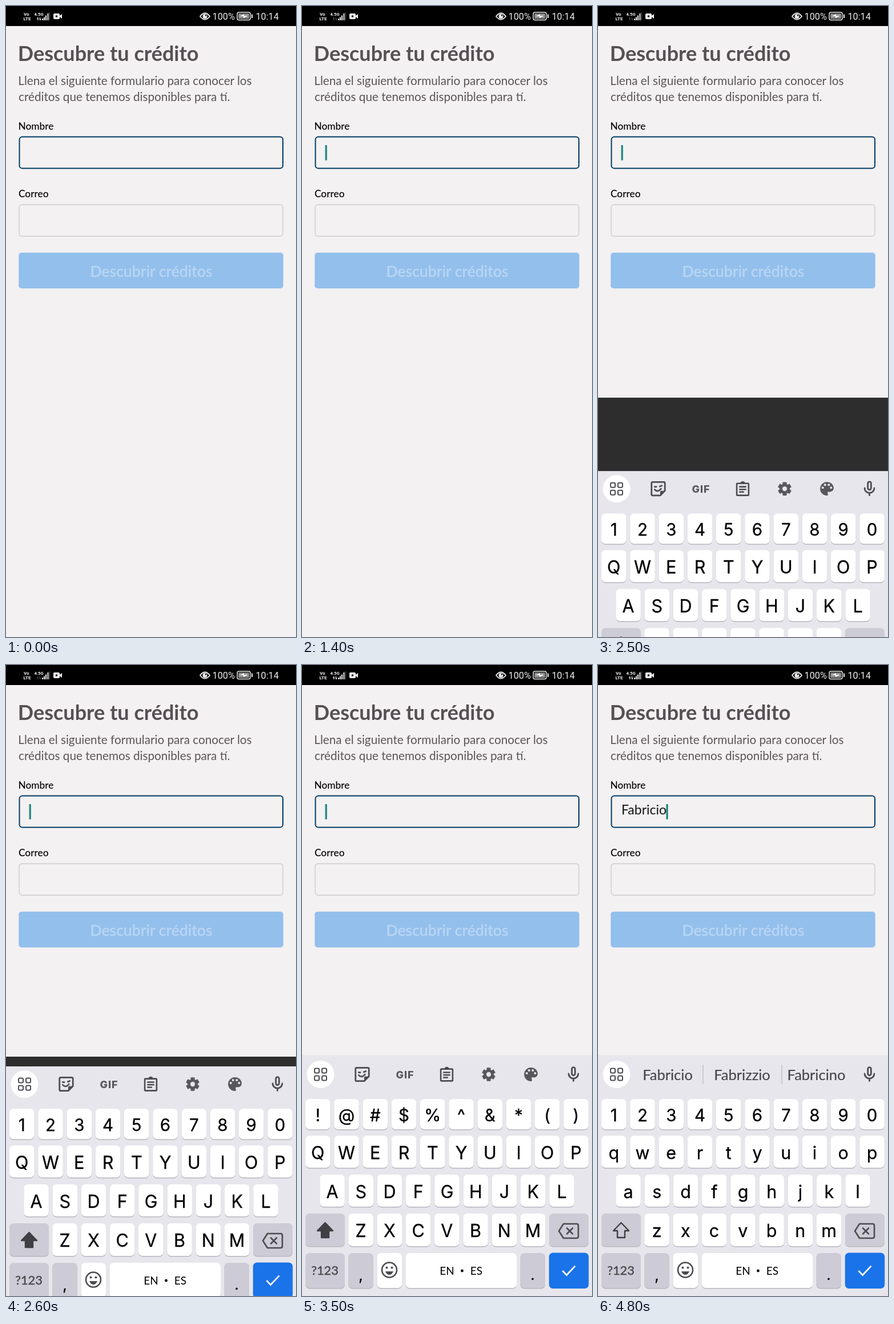
These frames come from a looping animation (508 by 1102 pixels, 5000 ms). An HTML page:

```html
<!DOCTYPE html>
<html lang="es">
<head>
<meta charset="utf-8">
<title>Descubre tu crédito</title>
<style>
html, body { margin: 0; width: 100%; height: 100%; overflow: hidden; background: #f3f1f2; }
svg { display: block; width: 100%; height: 100%; }
text { font-family: Lato, "Noto Sans", sans-serif; white-space: pre; }
.mid { text-anchor: middle; }
.key { font: 400 30.5px Inter, Roboto, sans-serif; text-anchor: middle; fill: #000; stroke: #000; stroke-width: .3; }
.digit { font-size: 29.5px; }
.mark { font-size: 26px; }
.word { font-size: 25.5px; fill: #48474c; text-anchor: middle; stroke: #48474c; stroke-width: .2; }
.bar { font-family: Roboto, sans-serif; fill: #ececec; }
.tiny { font: 700 8px Roboto, sans-serif; fill: #f4f4f4; }
.line { fill: none; stroke: #4b4b50; stroke-width: 2; stroke-linejoin: round; stroke-linecap: round; }
</style>
</head>
<body>
<svg viewBox="0 0 508 1102" preserveAspectRatio="none">
  <rect width="508" height="1102" fill="#f3f1f2"/>

  <g id="status">
    <rect width="508" height="35"/>
    <text class="tiny" x="31" y="17">Vo</text>
    <text class="tiny" x="30.5" y="25">LTE</text>
    <text class="tiny" x="49.5" y="17" style="font-size:7.6px">4.5G</text>
    <path id="arrows" d="M56 25V20.5M54.5 22L56 20.2M59.5 20V24.5M61 23L59.5 24.8" fill="none" stroke-width="1.3"/>
    <path d="M64 25v-3M67 25v-5.5M70 25v-8.5M73.5 25v-12" stroke="#f4f4f4" stroke-width="2"/>
    <path d="M76.5 25V11" stroke="#666" stroke-width="1"/>
    <rect x="83" y="13" width="11" height="10" rx="2" fill="#f4f4f4"/>
    <path d="M94 17l4-3v8l-4-3z" fill="#f4f4f4"/>
    <circle cx="88.5" cy="18" r="1.8"/>
    <path d="M340 18q8.500-11 17 0q-8.500 11-17 0z" fill="none" stroke="#ececec" stroke-width="1.8"/>
    <circle cx="348.5" cy="18" r="4" fill="#ececec"/>
    <circle cx="350" cy="16.5" r="1.2"/>
    <text class="bar" x="361.5" y="24" font-size="16.3">100%</text>
    <rect x="405" y="11" width="23" height="13.5" rx="3" fill="none" stroke="#ececec" stroke-width="1.5"/>
    <rect x="407" y="13" width="19" height="9.5" rx="1.5" fill="#8d8d8d"/>
    <path d="M409 18l8-3.5v2.5h7l-8 4v-3z" fill="#fff"/>
    <path d="M431 14.5v6.5" stroke="#ececec" stroke-width="2"/>
    <text class="bar" x="437.5" y="24" font-size="16.2">10:14</text>
  </g>

  <g id="form">
    <text x="20.8" y="95.5" font-size="36" font-weight="700" fill="#555053">Descubre tu crédito</text>
    <g font-size="20.7" fill="#5a5558">
      <text x="21.3" y="137.5">Llena el siguiente formulario para conocer los</text>
      <text x="22" y="166">créditos que tenemos disponibles para tí.</text>
    </g>
    <g font-size="17.3" font-weight="500">
      <text x="21.5" y="215.5">Nombre</text>
      <text x="22" y="334">Correo</text>
    </g>
    <rect x="23.5" y="228.5" width="461.5" height="55" rx="5" fill="none" stroke="#003a63" stroke-width="2"/>
    <rect x="23" y="347" width="462" height="55" rx="5" fill="none" stroke="#cfcdce" stroke-width="1.4"/>
    <rect x="22.3" y="430.8" width="463.4" height="62.4" rx="5" fill="#93bfec"/>
    <text class="mid" x="254.5" y="473" font-size="26.6" font-weight="500" fill="#b9d6f3" stroke="#b9d6f3" stroke-width=".3">Descubrir créditos</text>
    <text id="typed" x="41" y="261" font-size="23" fill="#161616"></text>
    <rect id="caret" y="243" width="3.2" height="26.5" fill="#1c857c"/>
  </g>

  <rect id="gap" y="684" width="508" height="418" fill="#2d2d2d"/>
  <rect id="edge" y="681" width="508" height="3" fill="#e9e8eb"/>
  <g id="board"></g>
</svg>
<script>
const $ = id => document.getElementById(id);
const LOOP = 5000, SLIDE = 418;
const PITCH = 50.25, INK = '#4b4b50';
const letters = [], digits = [];

const key = (x, y, w, h, fill = '#fff') =>
  `<rect x="${x}" y="${y + 1.5}" width="${w}" height="${h}" rx="7" fill="#b8b7bf"/>` +
  `<rect x="${x}" y="${y}" width="${w}" height="${h}" rx="7" fill="${fill}"/>`;

const row = (chars, x0, y, h, base, kind) => [...chars].map((c, i) => {
  const x = x0 + i * PITCH;
  return key(x, y, 43.5, h) +
    `<text class="key ${kind}" data-kind="${kind}" x="${x + 21.75}" y="${base}">${c}</text>`;
}).join('');

const icon = (cx, cy, scale, body) =>
  `<g transform="translate(${cx} ${cy}) scale(${scale}) translate(-12 -12)">${body}</g>`;

const tiles = [[22, 704.5], [35, 704.5], [22, 717.5], [35, 717.5]].map(([x, y]) =>
  `<rect class="line" x="${x}" y="${y}" width="8" height="8" rx="2"/>`).join('');

const sticker = icon(105.5, 715, 1.38,
  `<path class="line" d="M5 3.5H19Q20.5 3.5 20.5 5V14.5L14.5 20.5H5Q3.5 20.5 3.5 19V5Q3.5 3.5 5 3.5z"/>
   <path d="M14.5 20.5V16Q14.5 14.5 16 14.5H20.5z" fill="${INK}"/>
   <path class="line" d="M7.5 9.5h2M14 9l2.5-1M7.5 13q4 4 8-1"/>`);

const clipboard = icon(253.5, 716, 1.3,
  `<path class="line" d="M5 4H19Q20 4 20 5V19Q20 20 19 20H5Q4 20 4 19V5Q4 4 5 4z"/>
   <path d="M9 4a3 3 0 0 1 6 0z" fill="${INK}"/>
   <path class="line" d="M8 8.500h8M8 12h8M8 15.500h5"/>`);

const teeth = [0, 60, 120].map(a =>
  `<rect x="9" y="2" width="6" height="20" rx="1" transform="rotate(${a} 12 12)"/>`).join('');
const gear = icon(327, 715, 1.18,
  `<g fill="#58575c">${teeth}<circle cx="12" cy="12" r="7.5"/></g>
   <circle cx="12" cy="12" r="3.5" fill="#e7e6ec"/>`);

const palette = icon(401, 715, 1.32,
  `<path fill="#58575c" d="M12 3a9 9 0 0 0 0 18c.83 0 1.5-.67 1.5-1.5 0-.39-.15-.74-.39-1.01-.23-.26-.38-.61-.38-.99 0-.83.67-1.5 1.5-1.5H16c2.76 0 5-2.24 5-5 0-4.42-4.03-8-9-8z"/>` +
  [[6.5, 10.5], [9.5, 6.7], [14.5, 6.7], [17.5, 10.5]].map(([x, y]) =>
    `<circle cx="${x}" cy="${y}" r="1.5" fill="#e7e6ec"/>`).join(''));

const mic = icon(475.5, 715.2, 1.4,
  `<rect class="line" x="10" y="3" width="4" height="10" rx="2"/>
   <path class="line" d="M6 11a6 6 0 0 0 12 0M12 17V20"/>`);

const smiley = `<circle class="line" cx="153" cy="1056.5" r="13" style="stroke-width:2.6"/>
  <circle cx="148.5" cy="1052.5" r="2" fill="${INK}"/><circle cx="157.5" cy="1052.5" r="2" fill="${INK}"/>
  <path d="M146 1059h14q-2.5 6-7 6t-7-6z" fill="${INK}"/>`;

const backspace = `<path class="line" style="stroke-width:2.6" d="M458 976H481Q484 976 484 979V998Q484 1001 481 1001H458L450 988.5z
  M464 983.5l10 10M474 983.5l-10 10"/>`;

$('board').innerHTML = `
  <rect y="684" width="508" height="440" fill="#e7e6ec"/>
  <circle cx="32.5" cy="715" r="24" fill="#fff"/>${tiles}
  <g id="tools">${sticker}
    <text class="mid" x="180.5" y="721.5" fill="#58575c" style="font:800 18px Inter,sans-serif;letter-spacing:1px">GIF</text>
    ${clipboard}${gear}${palette}</g>
  <g id="hints">
    <path d="M184 698v34M322 698v34" stroke="#c3c2c9" stroke-width="1.5"/>
    ${[122, 252.5, 382.5].map(x => `<text class="word" x="${x}" y="725"></text>`).join('')}
  </g>${mic}
  ${row('1234567890', 6, 758, 53, 797, 'digit')}
  ${row('QWERTYUIOP', 6, 822, 56, 862.5, 'letter')}
  ${row('ASDFGHJKL', 31.3, 890, 56, 930.5, 'letter')}
  ${row('ZXCVBNM', 81.3, 958, 57, 999, 'letter')}
  ${key(6, 958, 69, 57, '#cdccd6')}${key(433, 958, 69, 57, '#cdccd6')}
  <path id="shift" d="M40.5 974L54 988H47V1000H34V988H27z" stroke="#3f3f44" stroke-width="2.4" stroke-linejoin="round"/>
  ${backspace}
  ${key(6, 1027, 69, 61, '#cdccd6')}${key(81.3, 1027, 43.5, 61, '#cdccd6')}
  ${key(131.5, 1027, 43.5, 61)}${key(181.5, 1027, 194.5, 61)}
  ${key(382.5, 1027, 43.5, 61, '#cdccd6')}
  <rect x="432.7" y="1026.5" width="69.5" height="62.5" rx="7" fill="#1a73e8"/>
  <text class="mid" x="40" y="1065" font-size="21.8" fill="#4b4b50" stroke="#4b4b50" stroke-width=".5">?123</text>
  <text class="key mark" x="103" y="1075">,</text>
  <text class="key mark" x="404" y="1074">.</text>
  ${smiley}
  <text class="mid" x="254" y="1064.5" font-size="19">EN</text>
  <circle cx="280.5" cy="1058" r="2.4"/>
  <text class="mid" x="305.5" y="1064.5" font-size="19">ES</text>
  <path d="M456.5 1058l7 7.5 15-16" fill="none" stroke="#fff" stroke-width="2.6"/>`;

document.querySelectorAll('[data-kind]').forEach(el => {
  const list = el.dataset.kind === 'digit' ? digits : letters;
  list.push([el, el.textContent]);
});
const words = [...document.querySelectorAll('.word')];

const NAME = 'Fabricio';
const countAt = t => t >= 4500 ? 8 : Math.min(5, Math.max(0, Math.floor((t - 3600) / 100)));
const hintsAt = t =>
  t >= 4800 ? ['Fabricio', 'Fabrizzio', 'Fabricino'] :
  t >= 4500 ? ['Fabri', 'Fabris', 'Fabricino'] :
  ['Fabi', 'Fabio', 'Fabricio'];

const show = (el, on) => el.setAttribute('visibility', on ? 'visible' : 'hidden');

function draw(now) {
  const t = Math.floor(now % LOOP / 100) * 100;

  $('arrows').setAttribute('stroke', t < 300 || t >= 3300 ? '#f4f4f4' : '#4a4a4a');

  // caret blinks every half second, then stays while typing
  $('typed').textContent = NAME.slice(0, countAt(t));
  const width = countAt(t) ? $('typed').getComputedTextLength() - 0.7 : -0.4;
  $('caret').setAttribute('x', 41 + width);
  show($('caret'), t >= 3300 || Math.floor((t + 200) / 500) % 2 === 1);

  // keyboard rises over a dark strip
  const u = Math.min(1, Math.max(0, (t - 2400) / 300));
  const drop = SLIDE * (1 - u) ** 2.915;
  $('board').setAttribute('transform', `translate(0 ${drop.toFixed(2)})`);
  show($('board'), u > 0);
  show($('gap'), u > 0 && u < 1);
  show($('edge'), u === 1);

  const lower = t >= 3700, symbols = t >= 3400 && !lower;
  letters.forEach(([el, c]) => el.textContent = lower ? c.toLowerCase() : c);
  digits.forEach(([el, c], i) => el.textContent = symbols ? '!@#$%^&*()'[i] : c);
  $('shift').setAttribute('fill', lower ? 'none' : '#3f3f44');

  const hints = t >= 3900;
  $('tools').style.display = hints ? 'none' : '';
  $('hints').style.display = hints ? '' : 'none';
  hintsAt(t).forEach((w, i) => words[i].textContent = w);
}

const start = performance.now();
(function frame() {
  draw(performance.now() - start);
  requestAnimationFrame(frame);
})();
</script>
</body>
</html>
```
